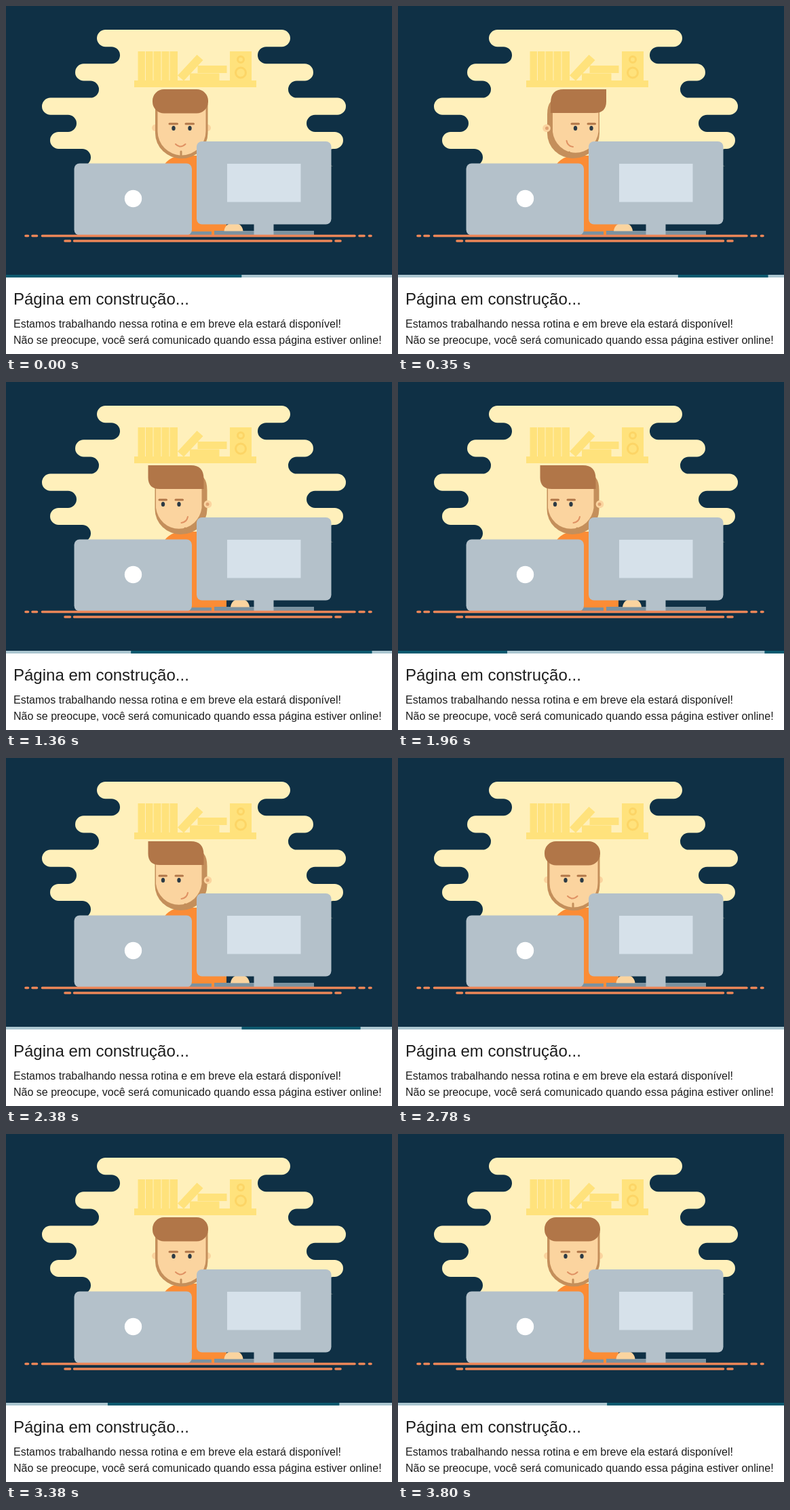
Write an HTML page that moves like this. It is 569x514 px and loops after 3.99 s.

```html
<!DOCTYPE html>
<html lang="pt-BR">
<head>
<meta charset="utf-8">
<title>Página em construção</title>
<style>
html, body { margin: 0; height: 100%; overflow: hidden; background: #fff; }
svg { display: block; }
text { font: 16px "Liberation Sans", Arial, sans-serif; fill: #1d1d1d; }
.title { font-size: 24px; }
.line { fill: none; stroke-linecap: round; }
</style>
</head>
<body>
<svg width="569" height="514" viewBox="0 0 569 514">
  <defs>
    <g id="front">
      <g fill="#fbd49f"><circle cx="220" cy="180" r="5"/><circle cx="297" cy="180" r="5"/></g>
      <path d="M220 145H297.500V188A38.500 37 0 0 1 220 188Z" fill="#c48f5b"/>
      <path d="M223.500 145H294.500V185A35.500 35.500 0 0 1 223.500 185Z" fill="#fbd49f"/>
      <path d="M258 215V223" class="line" stroke="#c48f5b" stroke-width="3"/>
      <rect x="216" y="123" width="82" height="35.500" rx="17" fill="#b17648"/>
      <path d="M241 174H252.500M265 174H276.500" class="line" stroke="#b17648" stroke-width="3"/>
      <g fill="#2b3a45"><ellipse cx="247" cy="180.500" rx="2.700" ry="3.500"/><ellipse cx="271" cy="180.500" rx="2.700" ry="3.500"/></g>
      <path d="M250 204Q257 211 264.500 204" class="line" stroke="#df9163" stroke-width="2"/>
    </g>
    <g id="side">
      <path d="M220 160Q220 135 240 135H297V188A38.500 37 0 0 1 220 188Z" fill="#c48f5b"/>
      <path d="M228 145H295.500V186A34 35 0 0 1 228 186Z" fill="#fbd49f"/>
      <circle cx="219" cy="180.500" r="5.800" fill="#fbd49f"/>
      <circle cx="219.500" cy="180.500" r="2.500" fill="#dfa271"/>
      <path d="M252.500 216V222" class="line" stroke="#c48f5b" stroke-width="3"/>
      <path d="M225 158V143Q225 123 244 123H307V141Q307 158 290 158Z" fill="#b17648"/>
      <path d="M256 174H266.500M280 174H290.500" class="line" stroke="#b17648" stroke-width="3"/>
      <g fill="#2b3a45"><ellipse cx="261.500" cy="180.500" rx="2.700" ry="3.500"/><ellipse cx="285" cy="180.500" rx="2.700" ry="3.500"/></g>
      <path d="M248.500 199Q250 207 258 208" class="line" stroke="#df9163" stroke-width="2"/>
    </g>
  </defs>

  <rect width="569" height="397" fill="#0f3045"/>
  <path id="blob" fill="#fff0bb"/>

  <g fill="#ffe27c">
    <path d="M189 110H369V120H189ZM194.500 67H205V110H194.500ZM206 67H216.500V110H206ZM217.500 67H228.500V110H217.500ZM229.500 67H240.500V110H229.500ZM241.500 67H253V110H241.500Z"/>
    <path d="M253 102.500L281.500 72L290.500 80L262 110.500ZM282.500 88H325.500V99H282.500ZM271 99.500H314.500V110H271ZM330 67H362V110H330Z"/>
  </g>
  <g fill="none" stroke="#fcd566" stroke-width="3"><circle cx="346" cy="79" r="4.500"/><circle cx="346" cy="98.500" r="7.500"/></g>

  <path d="M226 338V250Q234 221 262 221H290Q325 225 325 260V338Z" fill="#fb8c35"/>
  <use id="head" href="#front"/>

  <path d="M271 333H303V338H271ZM307 332H454V338H307Z" fill="#7b92a0"/>
  <path id="hand" d="M-14 332.500C-13 316 13 316 14 332.500Z" fill="#fbd49f"/>

  <g fill="#b4c1ca">
    <rect x="100.500" y="232.500" width="173.500" height="106" rx="8"/>
    <rect x="281" y="200" width="198.500" height="122.500" rx="8"/>
    <rect x="365.500" y="320" width="29" height="18"/>
  </g>
  <circle cx="187.500" cy="284.500" r="12.700" fill="#fff"/>
  <rect x="326" y="233" width="108.500" height="56.500" fill="#d6e1ea"/>

  <path class="line" stroke="#ec8658" stroke-width="3.600" d="M29 339.500H32.500M39 339.500H45.500M53.500 339.500H514M521 339.500H528M535.500 339.500H538M87 347H94.500M100.500 347H479.500M486 347H493"/>

  <rect y="397" width="569" height="4" fill="#abc6d0"/>
  <g fill="#0b5a70"><rect id="long" y="397" height="4"/><rect id="short" y="397" height="4"/></g>

  <text class="title" x="11" y="441">Página em construção...</text>
  <text x="11" y="475">Estamos trabalhando nessa rotina e em breve ela estará disponível!</text>
  <text x="11" y="499">Não se preocupe, você será comunicado quando essa página estiver online!</text>
</svg>
<script>
const W = 569, LOOP = 3990, CYCLE = 2100;
const $ = id => document.getElementById(id);

// Rounded steps: even rows bulge out, odd rows cut in.
const rows = [[134, 419], [168, 371], [102, 453], [137, 416], [53, 501], [104, 443], [65, 497], [125, 470]];
const STEP = 25.15, R = STEP / 2;
const arc = (i, dy) => `a${R} ${R} 0 0 ${i % 2 ? 0 : 1} 0 ${dy}`;
const inset = i => i % 2 ? -R : R;
let d = `M${rows[0][0] + R} 35`;
rows.forEach(([, right], i) => d += `H${right - inset(i)}` + arc(i, STEP));
for (let i = rows.length - 1; i >= 0; i--) d += `H${rows[i][0] + inset(i)}` + arc(i, -STEP);
$('blob').setAttribute('d', d + 'Z');

function bezier(x1, y1, x2, y2) {
  const at = (a, b, s) => 3 * a * s * (1 - s) ** 2 + 3 * b * s * s * (1 - s) + s ** 3;
  return x => {
    let lo = 0, hi = 1;
    for (let i = 0; i < 24; i++) {
      const mid = (lo + hi) / 2;
      if (at(x1, x2, mid) < x) lo = mid; else hi = mid;
    }
    return at(y1, y2, lo);
  };
}
const longEase = bezier(.65, .815, .735, .395);
const shortEase = bezier(.165, .84, .44, 1);

// Each bar sweeps during the first 60% of its cycle; edges are in percent.
function sweep(id, t, start, ease, from, to, end) {
  const age = (t - start + 2 * CYCLE) % CYCLE;
  const p = ease(Math.min(1, age / (CYCLE * .6)));
  const edge = v => Math.max(0, Math.min(W, v * W / 100));
  const left = edge(from + (to - from) * p);
  $(id).setAttribute('x', left);
  $(id).setAttribute('width', Math.max(0, edge(end * p) - left));
}

const ticks = [0, 200, 350, 550, 750, 940, 1140, 1360, 1540, 1740, 1960, 2180, 2380, 2570, 2780, 2990, 3190, 3380, 3600, 3800];
const poses = [[0, 'front'], [350, 'right'], [750, 'front'], [1360, 'left'], [2570, 'front'], [2990, 'right'], [3380, 'front']];
const handX = { front: 335.5, right: 332, left: 345 };

function draw(now) {
  const clock = now % LOOP;
  const t = ticks.findLast(v => v <= clock);
  const pose = poses.findLast(p => p[0] <= t)[1];
  $('head').setAttribute('href', pose === 'front' ? '#front' : '#side');
  $('head').setAttribute('transform', pose === 'left' ? 'translate(516.5 0) scale(-1 1)' : '');
  $('hand').setAttribute('transform', `translate(${handX[pose]} 0)`);
  sweep('long', t, 721, longEase, -35, 100, 190);
  sweep('short', t, 1883, shortEase, -200, 107, 108);
}

const begin = performance.now();
function loop() {
  draw(performance.now() - begin);
  requestAnimationFrame(loop);
}
loop();
</script>
</body>
</html>
```
